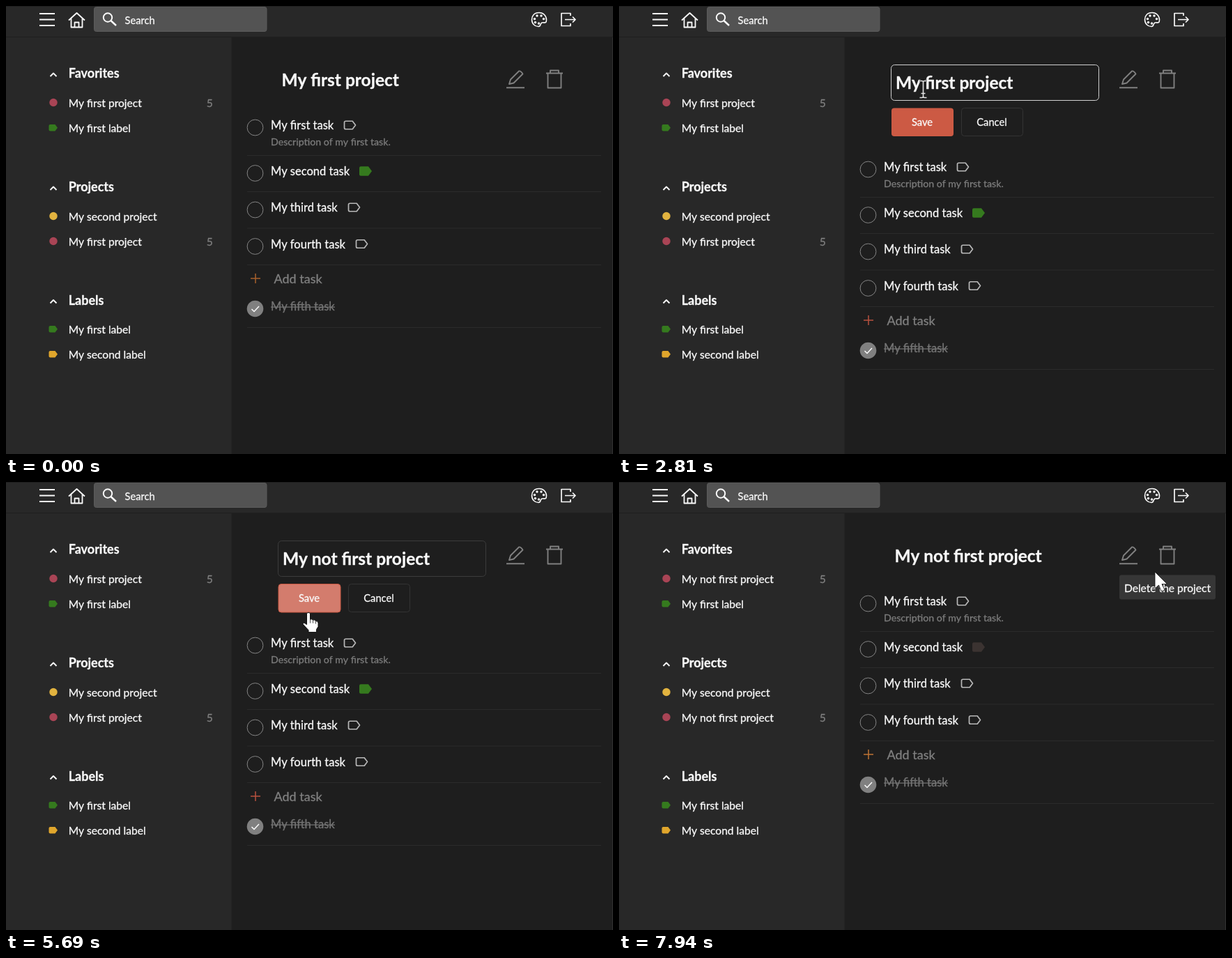
An HTML page with a canvas that plays this animation: 871 by 643 pixels, repeating every 8000 ms.

```html
<!DOCTYPE html>
<html lang="en">
<head>
<meta charset="utf-8">
<title>Renaming a project</title>
<style>
html, body { margin: 0; width: 100%; height: 100%; overflow: hidden; background: #1e1e1e; }
canvas { display: block; }
</style>
</head>
<body>
<canvas id="stage" width="871" height="643"></canvas>
<script>
const ctx = document.getElementById('stage').getContext('2d');
const LOOP = 8000, STEP = 78;
const EDIT_AT = 1150, BLUR_AT = 5530, SAVE_AT = 5770, TOOLTIP_AT = 7710;
const GREEN = '#357a1e', RED = '#a94455', YELLOW = '#e2b33f', ORANGE = '#e0a62c';
const WHITE = '#fafafa', GREY = '#808080';
const SMALL = 14.2, BUTTON = 14.7, BODY = 15.6, TASK = 16.5, HEAD = 18, TITLE = 24.5;

// Pointer path: time, x, y
const path = [
  [210, 495, 545], [370, 450, 330], [520, 427, 160], [670, 421, 103],
  [1230, 421, 103], [1560, 434, 118], [4540, 434, 118], [4605, 428, 70], [4675, 417, 6],
  [4850, 417, 6], [5100, 425, 80], [5380, 433, 186], [6150, 433, 185],
  [6690, 525, 155.5], [6995, 726, 153.5], [7280, 765, 125], [7540, 785, 106],
  [7710, 785, 106], [7930, 769, 129]
];
const clicks = [[990, 1230], [2040, 2340], [5530, 5690]];
const keyTimes = [3590, 3670, 3750, 3980];
const caretOn = [[1150, 1640], [2110, 2810], [3360, 4450], [4920, 5390]];

const tasks = [
  { name: 'My first task', y: 171, tag: 485, top: 152, bottom: 214.5 },
  { name: 'My second task', y: 236.5, tag: 507, filled: true, top: 214.5, bottom: 266.5 },
  { name: 'My third task', y: 289, tag: 491, top: 266.5, bottom: 319 },
  { name: 'My fourth task', y: 341.5, tag: 502, top: 319, bottom: 371.5 }
];

const during = (t, spans) => spans.some(([a, b]) => t >= a && t < b);
const inside = (p, x, y, w, h) => p.x >= x && p.x <= x + w && p.y >= y && p.y <= y + h;

// A hairline stroke gives the slightly heavy look of screen-rendered type.
function text(str, x, y, size, color = WHITE, weight = 400, align = 'left') {
  ctx.font = `${weight} ${size}px Lato, sans-serif`;
  ctx.textAlign = align;
  ctx.fillStyle = ctx.strokeStyle = color;
  ctx.lineWidth = .3;
  ctx.fillText(str, x, y);
  ctx.strokeText(str, x, y);
}

function box(x, y, w, h, r, fill, stroke) {
  ctx.beginPath();
  ctx.roundRect(x, y, w, h, r);
  paint(fill, stroke, 1);
}

function paint(fill, stroke, width) {
  if (fill) { ctx.fillStyle = fill; ctx.fill(); }
  if (stroke) { ctx.strokeStyle = stroke; ctx.lineWidth = width; ctx.stroke(); }
}

function disc(x, y, r, fill, stroke, width = 1) {
  ctx.beginPath();
  ctx.arc(x, y, r, 0, 7);
  paint(fill, stroke, width);
}

function shape(d, fill, stroke, width = 2, x = 0, y = 0) {
  ctx.save();
  ctx.translate(x, y);
  const p = new Path2D(d);
  if (fill) { ctx.fillStyle = fill; ctx.fill(p); }
  if (stroke) { ctx.strokeStyle = stroke; ctx.lineWidth = width; ctx.stroke(p); }
  ctx.restore();
}

function tag(x, cy, w, h, fill, stroke) {
  const k = h / 2;
  shape(`M2 ${-k}H${w - k * .75}L${w} 0L${w - k * .75} ${k}H2Q0 ${k} 0 ${k - 2}V${2 - k}Q0 ${-k} 2 ${-k}Z`,
    fill, stroke, 1.7, x, cy);
}

function pointerAt(t) {
  const s = 210 + Math.floor((t - 210) / STEP) * STEP;
  const i = path.findIndex(k => k[0] > s);
  if (i < 0) return { x: path.at(-1)[1], y: path.at(-1)[2] };
  if (i === 0) return { x: path[0][1], y: path[0][2] };
  const [t0, x0, y0] = path[i - 1], [t1, x1, y1] = path[i];
  const f = (s - t0) / (t1 - t0);
  return { x: x0 + (x1 - x0) * f, y: y0 + (y1 - y0) * f };
}

function drawHeader() {
  ctx.fillStyle = '#282828';
  ctx.fillRect(0, 0, 871, 44);
  ctx.fillRect(0, 44, 323.5, 599);
  ctx.fillStyle = '#1f1f1f';
  ctx.fillRect(0, 0, 871, 1);
  ctx.fillRect(0, 44, 871, 1);
  ctx.fillStyle = '#303030';
  ctx.fillRect(870, 45, 1, 598);
  shape('M48 11H70M48 19.5H70M48 28H70', null, WHITE);
  shape('M90 20.5L101.5 10L113 20.5M93.5 18V30.5H109.5V18M98.5 30V23.5H104.5V30', null, WHITE, 1.8);
  box(126.5, 1.5, 247.5, 35, 3, '#535353', '#5b5b5b');
  disc(146, 16.5, 6.2, null, WHITE, 2);
  shape('M150.5 21L158 28', null, WHITE, 2.4);
  text('Search', 170.5, 25.5, BUTTON);

  shape('M765 9.5C758 9.5 754.5 14 754.5 19.5C754.5 25.5 759 29.5 764 29.5C768 29.5 766 25 769 24C772 23 775.5 26 775.5 20C775.5 14 771 9.5 765 9.5Z', null, WHITE, 1.6);
  for (const [x, y] of [[762, 14], [768, 14], [771.5, 18.5], [758.5, 18.5], [759.5, 23.5], [764.5, 25]]) disc(x, y, 1.7, WHITE);
  shape('M810 14V10.5H797V28.5H810V25M802 19.5H817M813 15.5L817 19.5L813 23.5', null, WHITE, 1.7);
}

function heading(str, y) {
  shape('M-4.5 2.5L0 -2L4.5 2.5', null, WHITE, 1.9, 68, y + 2);
  text(str, 89.7, y + 6.5, HEAD, WHITE, 700);
}

function projectItem(str, y, color, count) {
  disc(68, y - .5, 5.7, color);
  text(str, 89.7, y + 5.5, BODY);
  if (count) text(count, 287.7, y + 5.5, BODY, GREY);
}

function labelItem(str, y, color) {
  tag(61.5, y - .7, 12.5, 9.5, color);
  text(str, 89.7, y + 5.5, BODY);
}

function drawSidebar(project) {
  heading('Favorites', 96.5);
  projectItem(project, 139, RED, '5');
  labelItem('My first label', 175.5, GREEN);
  heading('Projects', 259.5);
  projectItem('My second project', 302, YELLOW);
  projectItem(project, 338, RED, '5');
  heading('Labels', 422);
  labelItem('My first label', 464.5, GREEN);
  labelItem('My second label', 500.5, ORANGE);
}

function drawTasks(shift, p, t) {
  ctx.save();
  ctx.translate(0, shift);
  const rule = y => { ctx.fillStyle = '#2b2b2b'; ctx.fillRect(346, y - .5, 508, 1); };
  for (const row of tasks) {
    disc(357.5, row.y + 3.5, 11.4, null, '#858585');
    text(row.name, 380, row.y + 6, TASK);
    if (row.filled) tag(row.tag, row.y + .5, 18, 13.5, t < SAVE_AT ? GREEN : '#3b3331');
    else tag(row.tag + .5, row.y, 16, 11.5, null, '#b8b8b8');
    rule(row.bottom);
    const y = p.y - shift;
    if (t >= 210 && y >= row.top && y < row.bottom) {
      const cy = (row.top + row.bottom) / 2 - .5;
      for (const dy of [-5.5, 0, 5.5]) for (const x of [332.3, 338]) disc(x, cy + dy, 1.6, '#8c8c8c');
      for (const x of [829.7, 836.8, 843.8]) disc(x, cy - 1, 2, '#8c8c8c');
    }
  }
  text('Description of my first task.', 380, 200, SMALL, '#7c7c7c');
  const plus = t < 990 ? '#a8612c' : t < EDIT_AT ? '#86604a' : t < SAVE_AT ? '#b9523f' : '#c07434';
  shape('M351 391H365M358 384V398', null, plus, 1.5);
  text('Add task', 384.5, 398, HEAD, GREY);
  disc(357.5, 434.5, 11.8, GREY);
  shape('M352.5 435L356 438.5L363 431', null, WHITE, 1.5);
  text('My fifth task', 380, 437, TASK, '#757575');
  ctx.fillStyle = '#757575';
  ctx.fillRect(380, 431.5, 92, 1.2);
  rule(461.5);
  ctx.restore();
}

function drawActions(p) {
  for (const x of [711, 766]) if (inside(p, x, 85, 41, 41)) box(x, 85, 41, 41, 5, '#353535');
  shape('M718 117.3H744M722 112L724 105.5L736 93.5Q738.5 92.5 741.5 97.5L728.5 110.5Z', null, GREY, 1.9);
  shape('M775 96.5H799M781 96V92.5H793V96M777.5 97V117.5H796.5V97', null, GREY, 1.9);
}

function drawTitle(title, hovered) {
  ctx.font = `700 ${TITLE}px Lato, sans-serif`;
  if (hovered) box(390.5, 84.5, ctx.measureText(title).width + 10.5, 41.5, 5, '#353535');
  text(title, 395.5, 114.5, TITLE, WHITE, 700);
}

function drawEditor(title, typed, t, p) {
  box(390.5, 84.5, 298, 51, 5, '#1e1e1e', t < BLUR_AT ? '#d0d0d0' : '#3c3c3c');
  text(title, 397, 118.5, TITLE, WHITE, 700);
  if (during(t, caretOn)) {
    const before = t < 2270 ? title : 'My' + typed;
    ctx.fillStyle = WHITE;
    ctx.fillRect(Math.round(397 + ctx.measureText(before).width), 95, 1, 30);
  }
  const hot = inside(p, 391, 146, 89, 42);
  box(391, 146.5, 89, 40.5, 4, hot ? '#d37c6d' : '#cc5a44', hot ? '#cc5a44' : null);
  text('Save', 435, 172, BUTTON, WHITE, 400, 'center');
  box(491.5, 146.5, 88, 40, 4, null, '#333');
  text('Cancel', 535, 172, BUTTON, WHITE, 400, 'center');
}

function drawPointer(p, t, editing, overTitle) {
  if (t < 210) return;
  const overField = editing && inside(p, 391, 85, 297, 50);
  const overButton = editing && inside(p, 391, 146, 189, 42);
  const overIcon = inside(p, 711, 85, 41, 41) || inside(p, 766, 85, 41, 41);
  const clicking = during(t, clicks);
  if (clicking) disc(p.x, p.y, 18, 'rgba(188,178,24,.75)');
  if (overField || overTitle) {
    const beam = 'M-5 -12H-2Q0 -12 0 -10Q0 -12 2 -12H5M0 -10V10M-5 12H-2Q0 12 0 10Q0 12 2 12H5M-3 6H3';
    shape(beam, null, '#1a1a1a', 3, p.x + 2.5, p.y + 1.5);
    shape(beam, null, clicking ? '#dcd68a' : '#e4e4e4', 1.6, p.x + 2.5, p.y + 1.5);
  } else if (overButton || overIcon) {
    shape('M-2.5 2Q0 -1 2.5 2V10.5Q5 9.5 6.5 11.5Q9 10.5 10.5 13Q14 12.5 14 16V21L11.5 25V29H0V26L-8 17.5Q-8 13.5 -2.5 18Z',
      '#fff', '#111', 1, p.x + 1, p.y + 1);
    shape('M2.5 10V16M6.5 11.5V16M10.5 13V17', null, '#222', .8, p.x + 1, p.y + 1);
  } else {
    shape('M0 0V24L5.5 19L9.5 28L14 26L10 17.5H17.5Z', '#fff', '#111', .8, p.x, p.y);
  }
}

function draw(t) {
  const p = t < 210 ? { x: -99, y: -99 } : pointerAt(t);
  const editing = t >= EDIT_AT && t < SAVE_AT;
  const typed = ' not'.slice(0, keyTimes.filter(k => t >= k).length);
  const title = `My${typed} first project`;
  const overTitle = !editing && inside(p, 391, 85, 179, 41);

  ctx.lineJoin = 'round';
  ctx.fillStyle = '#1e1e1e';
  ctx.fillRect(0, 0, 871, 643);
  drawHeader();
  drawSidebar(t < SAVE_AT ? 'My first project' : title);
  drawActions(p);
  if (editing) drawEditor(title, typed, t, p);
  else drawTitle(title, overTitle);
  drawTasks(editing ? 60 : 0, p, t);
  if (t >= TOOLTIP_AT) {
    box(718, 133.5, 138, 35, 3, '#363636');
    text('Delete the project', 787, 157.5, BODY, WHITE, 400, 'center');
  }
  drawPointer(p, t, editing, overTitle);
}

const start = performance.now();
function tick() {
  draw((performance.now() - start) % LOOP);
  requestAnimationFrame(tick);
}
tick();
</script>
</body>
</html>
```
